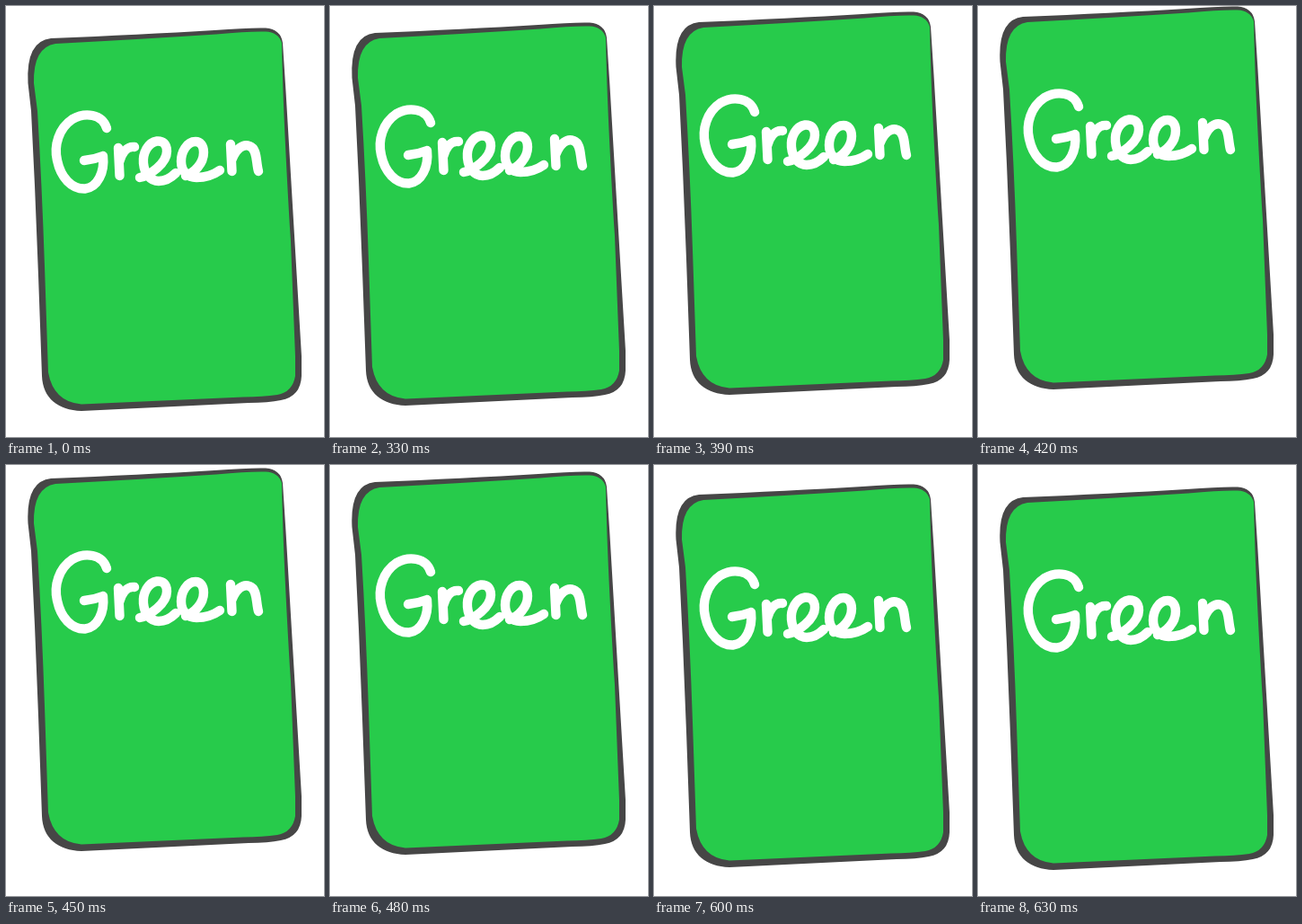
An HTML page for the animation above (0.96 s loop, 354 px wide and 480 px high).

```html
<!DOCTYPE html>
<html lang="en">
<head>
<meta charset="utf-8">
<title>Green card</title>
<style>
  html, body { margin: 0; height: 100%; overflow: hidden; background: #fff; }
  svg { display: block; width: 354px; height: 480px; }
  .lettering { fill: none; stroke: #fff; stroke-width: 10.4; stroke-linecap: round; stroke-linejoin: round; }
</style>
</head>
<body>
<svg viewBox="0 0 354 480" role="img" aria-label="Green">
  <g id="card">
    <path fill="#464646" d="M50 36 Q150 32 232 27 Q270 24 289 24.5 Q306 26 308 41 L311.5 95 L318 205 L329 390 L329 412 Q328 435 306 439 Q292 442 270 442 L84 451 C58 450 41 437 40 412 L36 300 L32 200 L28 117 L24.5 86 Q22 39 50 36Z"/>
    <path fill="#27cb4b" d="M55 42 Q150 37 234 31.5 Q270 28 289 28.5 Q303 29 307 41 C308 100 312 180 317 262 Q320 340 322 390 L322 412 Q319 430 302 433 Q286 435 264 435.5 L84 443.5 Q53 441 47 408 Q45 350 43 290 Q40 200 35 117 L31 86 Q30 46 55 42Z"/>
    <g class="lettering">
      <path d="M112 136 C107 120 88 118 74 126 C59 136 53 155 57 172 C61 191 73 204 88 203.5 C102 202 110 185 108 167 Q98 171 87 172"/>
      <path d="M125 158 L126.5 189 M126 174 C129 163 135 156 143 157"/>
      <path d="M149 191 C160 189 179 175 179 162 C179 153 174 150 168 150.5 C158 152 152 164 153 175 C154 187 161 195 170 195 C178 195 184 191 189 186"/>
      <path d="M200 189 C209 186 220 176 220 163 C220 155 216 151 211 151 C201 151 195 163 195 173 C195 185 203 191 212 191 C222 191 231 188 238 183"/>
      <path d="M250 154 L251.5 184 M251.5 171 C256 159 264 153 271 156 C280 159 278 173 281 184"/>
    </g>
  </g>
</svg>
<script>
  const LOOP = 960, STEP = 30, START = 10, RISE = 4, FALL = 7, HEIGHT = 24;
  const card = document.getElementById('card');

  // Linear lift, slower linear drop, advanced in 30 ms steps of whole pixels.
  function lift(time) {
    const step = Math.floor((time % LOOP) / STEP) - START;
    return Math.round(HEIGHT * Math.max(0, Math.min(step / RISE, (RISE + FALL - step) / FALL)));
  }

  function draw(now) {
    card.setAttribute('transform', `translate(0 ${-lift(now)})`);
    requestAnimationFrame(draw);
  }
  draw(performance.now());
</script>
</body>
</html>
```
